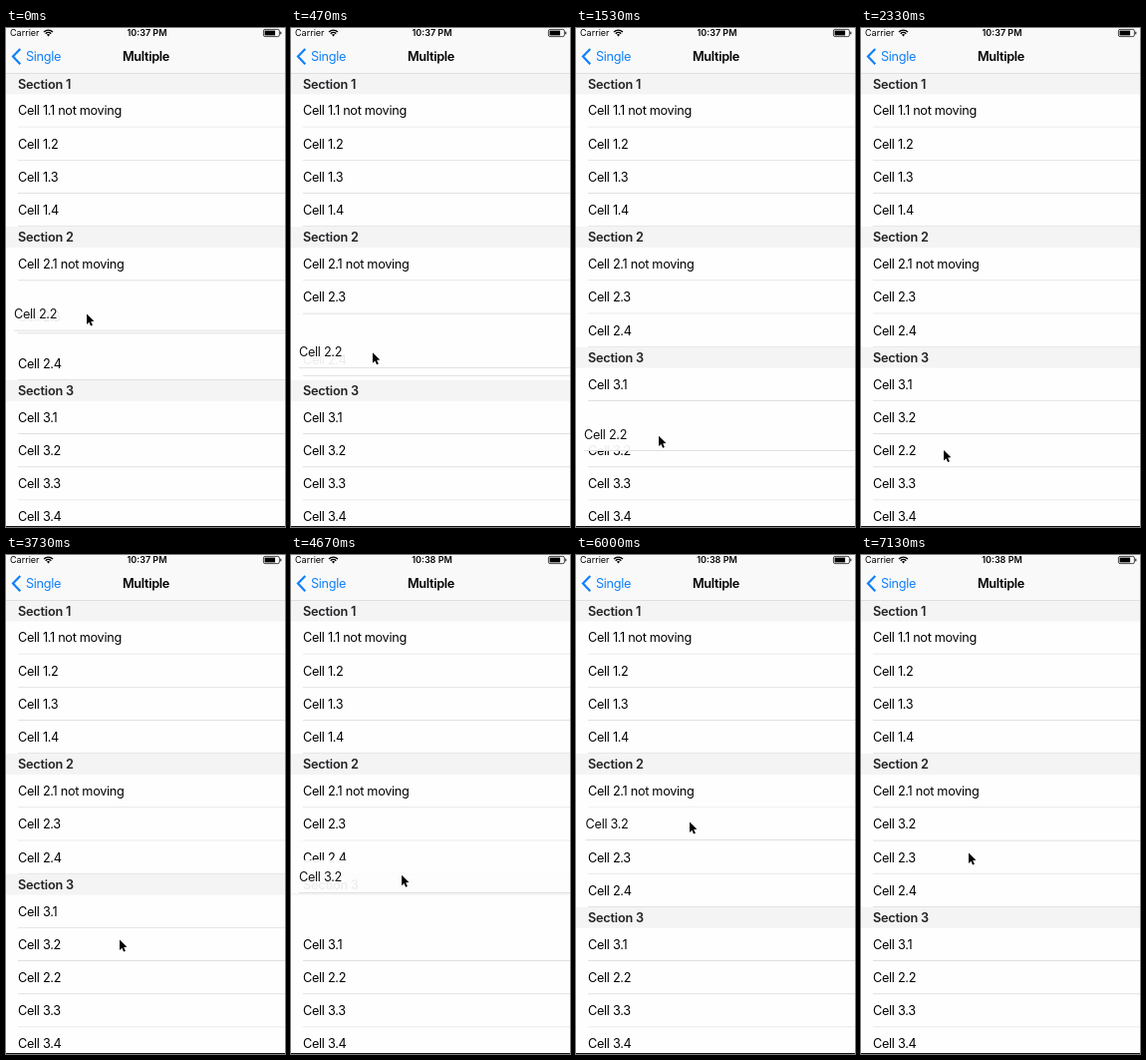
Animation of 280 by 500 pixels, one loop 8 s. Source, as an HTML page with a canvas:

```html
<!DOCTYPE html>
<html lang="en">
<head>
<meta charset="utf-8">
<title>Reorderable list</title>
<style>
  html, body { margin: 0; width: 100%; height: 100%; overflow: hidden; background: #fefefe; }
  canvas { display: block; width: 280px; height: 500px; }
</style>
</head>
<body>
<canvas id="stage" width="280" height="500"></canvas>
<script>
const ctx = document.getElementById('stage').getContext('2d');
const LOOP = 8000, FRAME = 1000 / 15;
const ROW = 33.2, HEADER = 20.9, TOP = 45.5, INSET = 12;
const SLIDE = 300;
const FONT = 'Inter, Roboto, sans-serif';

const sectionTop = n => TOP + (n - 1) * (HEADER + 4 * ROW);
const rowTop = (section, n) => sectionTop(section) + HEADER + (n - 1) * ROW;
const clamp = p => Math.min(1, Math.max(0, p));
const ease = p => (1 - Math.cos(Math.PI * clamp(p))) / 2;

// Linear interpolation through [time, ...values] keys.
function track(t, keys) {
  if (t <= keys[0][0]) return keys[0].slice(1);
  for (let i = 1; i < keys.length; i++) {
    const [a, b] = [keys[i - 1], keys[i]];
    if (t < b[0]) {
      const p = (t - a[0]) / (b[0] - a[0]);
      return a.slice(1).map((v, j) => v + (b[j + 1] - v) * p);
    }
  }
  return keys[keys.length - 1].slice(1);
}

// A row or header that makes room: one row up at `up`, back down at `down`.
const slide = (t, y, up, down) =>
  y - ROW * (ease((t - up) / SLIDE) - ease((t - down) / SLIDE));

function text(str, x, baseline, { size = 12.7, weight = 400, color = '#000', align = 'left', spacing = -0.3 } = {}) {
  ctx.font = `${weight} ${size}px ${FONT}`;
  ctx.letterSpacing = spacing + 'px';
  ctx.textAlign = align;
  ctx.fillStyle = color;
  ctx.fillText(str, x, baseline);
}

function rect(x, y, w, h, color) {
  ctx.fillStyle = color;
  ctx.fillRect(x, y, w, h);
}

function row(label, y, x = INSET) {
  rect(0, y, 280, ROW, '#fefefe');
  rect(x, y + ROW - 0.8, 280 - x, 0.8, '#d9d9dc');
  text('Cell ' + label, x, y + ROW / 2 + 4.4);
}

function header(n, y) {
  rect(0, y, 280, HEADER, '#f4f4f5');
  text('Section ' + n, INSET, y + HEADER / 2 + 4.6, { weight: 600, color: '#222224', spacing: -0.2 });
}

function draggedRow(label, y, lift) {
  ctx.globalAlpha = 1 - 0.07 * lift;
  row(label, y, INSET - 4 * lift);
  ctx.globalAlpha = 1;
}

function statusBar(t) {
  text('Carrier', 4, 8.2, { size: 9, spacing: 0 });
  text(t < 4270 ? '10:37 PM' : '10:38 PM', 141.5, 8.2, { size: 9, weight: 600, align: 'center', spacing: 0 });

  ctx.strokeStyle = ctx.fillStyle = '#000';
  ctx.lineWidth = 1.4;
  for (const r of [6.3, 3.9]) {
    ctx.beginPath();
    ctx.arc(42.5, 8.4, r, -Math.PI * 0.75, -Math.PI * 0.25);
    ctx.stroke();
  }
  ctx.beginPath();
  ctx.moveTo(42.5, 8.4);
  ctx.arc(42.5, 8.4, 2.2, -Math.PI * 0.75, -Math.PI * 0.25);
  ctx.fill();

  ctx.lineWidth = 0.7;
  ctx.beginPath();
  ctx.roundRect(258.4, 1.4, 16, 7.2, 1.6);
  ctx.stroke();
  rect(259.6, 2.6, 10.5, 4.8, '#000');
  rect(275.3, 3.7, 1, 2.6, '#000');
}

function navBar(t) {
  rect(0, 0, 280, TOP, '#f9f9f9');
  rect(0, TOP - 0.5, 280, 0.5, '#c4c4c6');
  statusBar(t);
  ctx.strokeStyle = '#1080fb';
  ctx.lineWidth = 2.2;
  ctx.beginPath();
  ctx.moveTo(14.3, 21);
  ctx.lineTo(7, 28.6);
  ctx.lineTo(14.3, 36.2);
  ctx.stroke();
  text('Single', 20, 33.2, { color: '#1080fb' });
  text('Multiple', 140.5, 33.2, { weight: 600, align: 'center' });
}

function cursor(x, y) {
  const outline = [[0, 0], [0, 10.4], [2.4, 8.2], [4.1, 12], [5.9, 11.2], [4.2, 7.5], [7.4, 7.3]];
  ctx.beginPath();
  for (const [dx, dy] of outline) ctx.lineTo(x + dx, y + dy);
  ctx.closePath();
  ctx.lineJoin = 'round';
  ctx.strokeStyle = '#fff';
  ctx.lineWidth = 1.6;
  ctx.stroke();
  ctx.fillStyle = '#000';
  ctx.fill();
  ctx.lineJoin = 'miter';
}

// Centre of each dragged row over time.
const firstDrag = [[0, 287], [1000, 367], [1530, 407], [1760, 422.5], [2130, 422.5], [2330, 423.6]];
const secondDrag = [[3870, 390.4], [4000, 386], [4670, 322], [5050, 317], [5270, 278],
  [5530, 271], [5670, 269], [5930, 269], [6130, 269.9]];
const pointer = [[0, 81, 286.5], [1000, 83, 369.5], [1530, 83, 408.5], [1760, 83, 423],
  [2400, 83, 423], [3070, 115, 395], [3665, 115, 395], [3730, 114, 385.5], [3870, 114, 385.5],
  [4000, 113.5, 382], [4670, 111, 320.5], [5050, 113, 315], [5270, 115, 274.5],
  [5530, 114.5, 269], [5670, 114, 267.5], [6200, 114, 267.5], [7070, 108, 299], [7130, 108, 298.5]];

function draw(t) {
  rect(0, 0, 280, 500, '#fefefe');

  for (const n of [1, 2, 3, 4]) row('1.' + n + (n === 1 ? ' not moving' : ''), rowTop(1, n));
  row('2.1 not moving', rowTop(2, 1));
  row('2.3', slide(t, rowTop(2, 3), -132, 5210));
  row('2.4', slide(t, rowTop(2, 4), 400, 5070));
  row('3.1', slide(t, rowTop(3, 1), 1100, 4100));
  row('3.3', rowTop(3, 3));
  row('3.4', rowTop(3, 4));

  const firstActive = t < 2330;
  const first = () => draggedRow('2.2', track(t, firstDrag)[0] - ROW / 2, 1 - ease((t - 2130) / 200));
  const second = () => t < 3870
    ? row('3.2', slide(t, rowTop(3, 2), 1560, Infinity))
    : draggedRow('3.2', track(t, secondDrag)[0] - ROW / 2,
        ease((t - 3800) / 200) - ease((t - 5900) / 230));

  if (firstActive) second(); else first();
  header(1, sectionTop(1));
  header(2, sectionTop(2));
  header(3, slide(t, sectionTop(3), 890, 5070));
  if (firstActive) first(); else second();

  navBar(t);
  rect(0, 499, 280, 1, '#111');
  cursor(...track(t, pointer));
}

function tick() {
  const t = performance.now() % LOOP;
  draw(Math.floor(t / FRAME + 0.06) * FRAME);
  requestAnimationFrame(tick);
}
tick();
</script>
</body>
</html>
```
